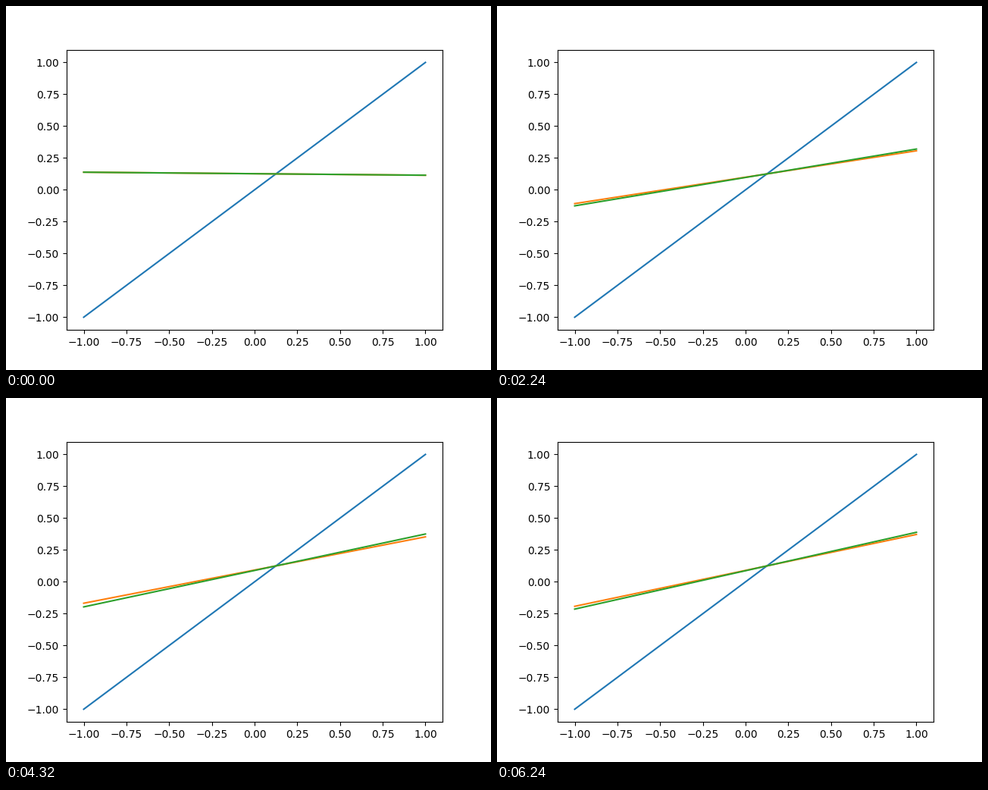
Animation, 640 px wide and 480 px high, one loop 6400 ms. Source, as a matplotlib script:

```python
import numpy as np
import matplotlib.pyplot as plt
from matplotlib.animation import FuncAnimation

FRAMES = 40
INTERVAL = 160
PIVOT = 0.125  # both fitted lines always pass through (PIVOT, PIVOT)


def slow_slope(step):
    """A quick start, then a long approach to the final slope."""
    return 0.30 - 0.232 * np.exp(-0.0655 * step) - 0.08 * np.exp(-0.6 * step)


def fast_slope(step):
    """Pulls ahead of the slow line midway, then the lead fades."""
    onset = 1 / (1 + np.exp((14.5 - step) / 2.5))
    return slow_slope(step) + 0.0484 * np.exp(-0.0233 * step) * onset


def fitted(slope):
    return PIVOT + slope * (x - PIVOT)


fig, ax = plt.subplots(figsize=(6.4, 4.8), dpi=100)
x = np.linspace(-1, 1, 2)
ax.plot(x, x)
slow_line, = ax.plot(x, fitted(slow_slope(0)))
fast_line, = ax.plot(x, fitted(fast_slope(0)))


def update(step):
    slow_line.set_ydata(fitted(slow_slope(step)))
    fast_line.set_ydata(fitted(fast_slope(step)))
    return slow_line, fast_line


anim = FuncAnimation(fig, update, frames=FRAMES, interval=INTERVAL,
                     repeat=True, repeat_delay=0)
plt.show()
```
